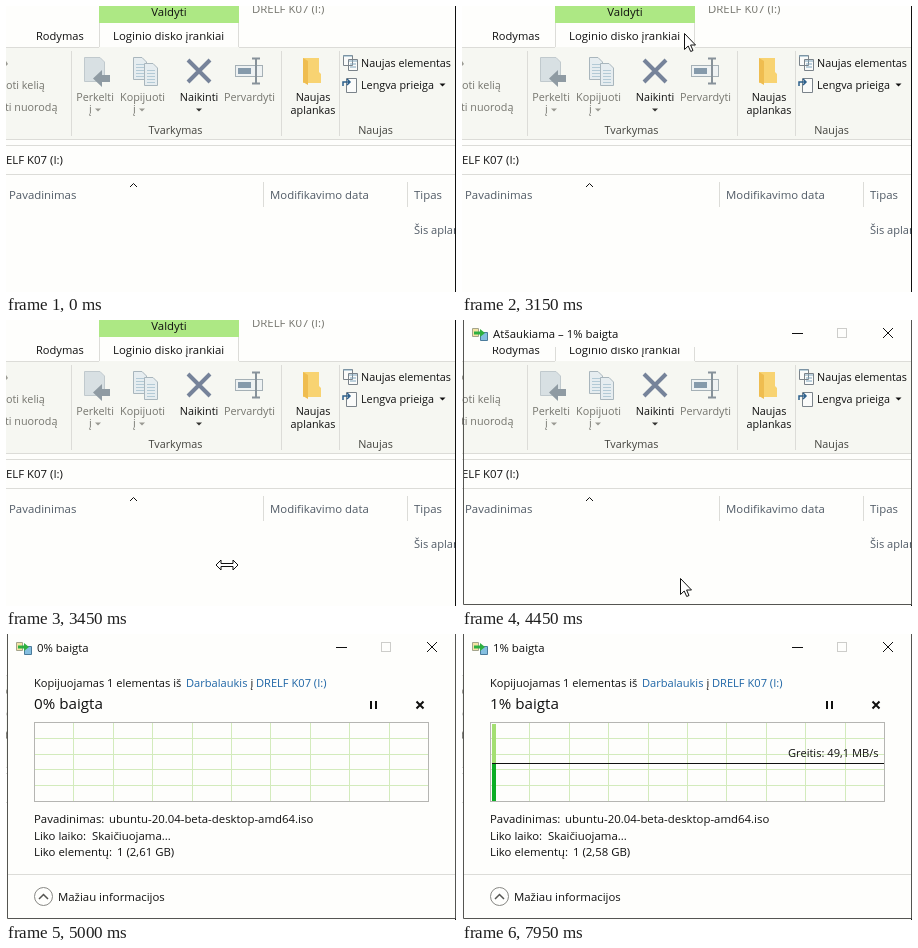
An HTML page for the animation above (8000 ms loop, 450x286 px).

```html
<!DOCTYPE html>
<html lang="lt">
<head>
<meta charset="utf-8">
<title>Failo kopijavimas</title>
<style>
html, body { margin: 0; width: 100%; height: 100%; overflow: hidden; background: #fefefc; }
svg { display: block; }
text { font: 11.4px "Open Sans", "Noto Sans", sans-serif; fill: #101010; white-space: pre; }
.ribbon text { font-size: 10.8px; }
.mid { text-anchor: middle; }
.end { text-anchor: end; }
text.dim { fill: #76766f; }
text.soft { fill: #44443f; }
text.head { fill: #515b66; }
text.link { fill: #1f66a6; }
text.big { font-size: 15.2px; }
.route text, text.tight { font-size: 11.1px; }
.paper { fill: #fefefc; }
.line { fill: none; stroke: #dcdcd8; }
.ink { fill: none; stroke: #101010; }
</style>
</head>
<body>
<svg width="450" height="286" viewBox="0 0 450 286">
  <defs>
    <path id="drop" d="M-3-1.5H3L0 1.5Z"/>
    <g id="sheet">
      <path d="M.5.5H9L13.500 5V22.500H.5Z" fill="#e6edf0" stroke="#a9b6bd"/>
      <path d="M3 7.500H11M3 10.500H11M3 13.500H11M3 16.500H11M3 19.500H11" stroke="#b3cad6"/>
    </g>
  </defs>

  <g id="explorer">
    <rect class="paper" width="450" height="286"/>
    <rect x="93" width="140" height="17" fill="#ade884"/>
    <path class="line" d="M93.500 17V41M232.500 17V41"/>
    <text class="mid" x="163" y="9.500">Valdyti</text>
    <text class="dim" x="246" y="7">DRELF K07 (I:)</text>
    <text x="-5" y="34">s</text>
    <text class="tight" x="30" y="34">Rodymas</text>
    <text x="107" y="34">Loginio disko įrankiai</text>

    <g class="ribbon">
      <rect y="41" width="450" height="92" fill="#f6f7f2"/>
      <path class="line" d="M0 41.500H93M233 41.500H450M0 133.500H450M65.500 45V130M275.500 45V130M333.500 45V130"/>
      <path d="M0 55L2 58 0 60Z" fill="#999992"/>
      <text class="dim" x="0" y="83">oti kelią</text>
      <text class="dim" x="-1" y="105">ti nuorodą</text>

      <path d="M78.500 51.500H94L98.500 56V75.500H78.500Z" fill="#d8e0e3" stroke="#c0c9cd"/>
      <path d="M104 69H96V64L87 72.500 96 81V76H104Z" fill="#8f9ba3"/>
      <text class="dim mid" x="89" y="95">Perkelti</text>
      <text class="dim" x="83" y="107">į</text>
      <use href="#drop" x="92" y="104" fill="#999992"/>

      <use href="#sheet" x="127" y="51"/><use href="#sheet" x="138" y="57"/>
      <text class="dim mid" x="136.500" y="95">Kopijuoti</text>
      <text class="dim" x="127" y="107">į</text>
      <use href="#drop" x="136" y="104" fill="#999992"/>

      <path d="M182 54L204 76M204 54L182 76" stroke="#76839a" stroke-width="4"/>
      <text class="mid" x="193" y="95">Naikinti</text>
      <use href="#drop" x="193" y="104" fill="#333330"/>

      <rect x="229.500" y="59.500" width="27" height="11" fill="#eef2f3" stroke="#a5b0b6"/>
      <rect x="232" y="62" width="13" height="6" fill="#859aab"/>
      <path d="M246 52.500H254M246 77.500H254M250 53V77" stroke="#87929a" stroke-width="2"/>
      <text class="dim mid" x="243.500" y="95">Pervardyti</text>

      <path d="M297 52H313V66L315 68V77H297Z" fill="#f8d372"/>
      <path d="M297 52L302 55V79L297 76Z" fill="#efbd50"/>
      <text class="mid" x="307" y="95">Naujas</text>
      <text class="mid" x="307" y="108">aplankas</text>

      <g fill="#fafbfa" stroke="#7a838a">
        <path d="M337.500 49.500H346.500V59.500H337.500ZM342.500 53.500H351.500V64.500H342.500Z"/>
        <path d="M340.500 72.500H350.500V86.500H340.500Z"/>
      </g>
      <path d="M337 50H346M343 55H351M344 58H350M344 61H350" stroke="#7fa5bd"/>
      <path d="M337 80V76H343M341 73L344 76 341 79" fill="none" stroke="#2d608c" stroke-width="1.500"/>
      <text x="355" y="61">Naujas elementas</text>
      <text x="355" y="83">Lengva prieiga</text>
      <use href="#drop" x="436.500" y="79" fill="#101010"/>
      <text class="soft mid" x="169.500" y="128">Tvarkymas</text>
      <text class="soft mid" x="369.500" y="128">Naujas</text>
    </g>

    <path class="line" d="M0 139.500H450M0 168.500H450M257.500 176V201M401.500 176V201"/>
    <text class="end" x="57" y="158">DRELF K07 (I:)</text>
    <path class="ink" d="M124 181L127.500 177.500 131 181"/>
    <text class="head" x="3" y="193">Pavadinimas</text>
    <text class="head" x="264" y="193">Modifikavimo data</text>
    <text class="head" x="408" y="193">Tipas</text>
    <text class="head tight" x="408" y="228">Šis aplankas</text>
    <path class="ink" d="M449.500 0V286"/>
  </g>

  <g id="dialog">
    <g id="content">
      <rect class="paper" x="1" y="27" width="448" height="257"/>
      <g class="route">
        <text x="28" y="53">Kopijuojamas 1 elementas iš</text>
        <text class="link" x="180" y="53">Darbalaukis</text>
        <text x="244.500" y="53">į</text>
        <text class="link" x="250" y="53">DRELF K07 (I:)</text>
      </g>
      <text class="big" id="percent" x="28" y="75"></text>
      <path class="ink" stroke-width="2" d="M365 67V75M370 67V75M410.500 67.500L417.500 74.500M417.500 67.500L410.500 74.500"/>

      <rect class="paper" x="28.500" y="88.500" width="394" height="79" stroke="#b5b5b2"/>
      <path id="grid" fill="none" stroke="#d3ebbc"/>
      <g id="speed">
        <rect id="done" x="30" y="90" height="77" fill="#a4df72"/>
        <rect id="rate" x="30" y="129" height="38" fill="#0cad25"/>
        <path class="ink" d="M30 129.500H422"/>
        <text class="end tight" x="416.500" y="123">Greitis: 49,1 MB/s</text>
      </g>

      <text x="28" y="189">Pavadinimas:</text>
      <text x="103" y="189">ubuntu-20.04-beta-desktop-amd64.iso</text>
      <text x="28" y="206">Liko laiko:</text>
      <text x="86" y="206">Skaičiuojama...</text>
      <text x="28" y="222">Liko elementų:</text>
      <text id="left" x="111" y="222"></text>
      <path class="line" d="M2 240.500H449"/>
      <circle cx="37.500" cy="262.500" r="9" fill="none" stroke="#888884"/>
      <path d="M33 265L37.500 260.500 42 265" fill="none" stroke="#555552" stroke-width="1.500"/>
      <text x="52" y="267">Mažiau informacijos</text>
    </g>
    <rect class="paper" x="1" width="448" height="27"/>
    <path d="M10.500 8.500H16.500V16.500H10.500Z" fill="#f3e4a4" stroke="#a4a48c"/>
    <path d="M18.500 12.500H25.500V20.500H18.500Z" fill="#85bfe0" stroke="#4b7b9b"/>
    <path d="M12 11.500H18V9L23 13 18 17V14.500H12Z" fill="#2eb040"/>
    <text id="title" x="31" y="18"></text>
    <path class="ink" d="M330 13.500H341M421 8L431 18M431 8L421 18"/>
    <rect x="375.500" y="8.500" width="9" height="9" fill="none" stroke="#cdcdca"/>
    <path d="M1.500 0V284.500H449.500V0" fill="none" stroke="#555552"/>
  </g>

  <g fill="#fff" stroke="#111">
    <path id="arrow" d="M.5.5V16.500L4.200 13 6.700 18.500 9 17.500 6.600 12H11.500Z"/>
    <path id="resize" d="M-11 0L-6-5V-1.500H6V-5L11 0 6 5V1.500H-6V5Z"/>
  </g>
</svg>
<script>
const LOOP = 8000, STEP = 50;
const el = Object.fromEntries([...document.querySelectorAll('[id]')].map(e => [e.id, e]));
const show = (node, on) => node.setAttribute('visibility', on ? 'inherit' : 'hidden');
const place = (node, x, y) => node.setAttribute('transform', `translate(${x} ${y})`);
const setText = (node, value) => { if (node.textContent !== value) node.textContent = value; };

let grid = '';
for (let i = 1; i < 10; i++) grid += `M${Math.round(28 + i * 39.4) + .5} 89V167`;
for (let i = 1; i < 5; i++) grid += `M29 ${Math.round(88 + i * 15.8) + .5}H422`;
el.grid.setAttribute('d', grid);

// Pointer stops: time, x, y
const pointer = [[3150, 222, 27], [3450, 221, 245], [3900, 218, 258], [4450, 218, 258], [4750, 218, 290]];

function pointerAt(t) {
  const i = pointer.findIndex(stop => stop[0] > t);
  if (i < 1) return null;
  const [t0, x0, y0] = pointer[i - 1], [t1, x1, y1] = pointer[i];
  const p = (t - t0) / (t1 - t0), k = p * p * (3 - 2 * p);
  return [Math.round(x0 + (x1 - x0) * k), Math.round(y0 + (y1 - y0) * k)];
}

function draw(time) {
  const t = Math.floor(time / STEP) * STEP;
  const pos = pointerAt(t), resizing = t >= 3400 && t < 3550;
  show(el.arrow, pos && !resizing);
  show(el.resize, pos && resizing);
  if (pos) {
    place(el.arrow, ...pos);
    place(el.resize, ...pos);
  }

  const opening = t < 4500, copying = t >= 7500;
  const label = `${copying ? 1 : 0}% baigta`;
  show(el.dialog, t >= 4450);
  show(el.content, !opening);
  show(el.speed, copying);
  setText(el.title, opening ? 'Atšaukiama – 1% baigta' : label);
  setText(el.percent, label);
  setText(el.left, copying ? '1 (2,58 GB)' : '1 (2,61 GB)');
  const width = 2 + 2 * Math.min(1, Math.max(0, (t - 7500) / 400));
  el.done.setAttribute('width', width);
  el.rate.setAttribute('width', width);
}

const start = performance.now();
function tick() {
  draw((performance.now() - start) % LOOP);
  requestAnimationFrame(tick);
}
tick();
</script>
</body>
</html>
```
